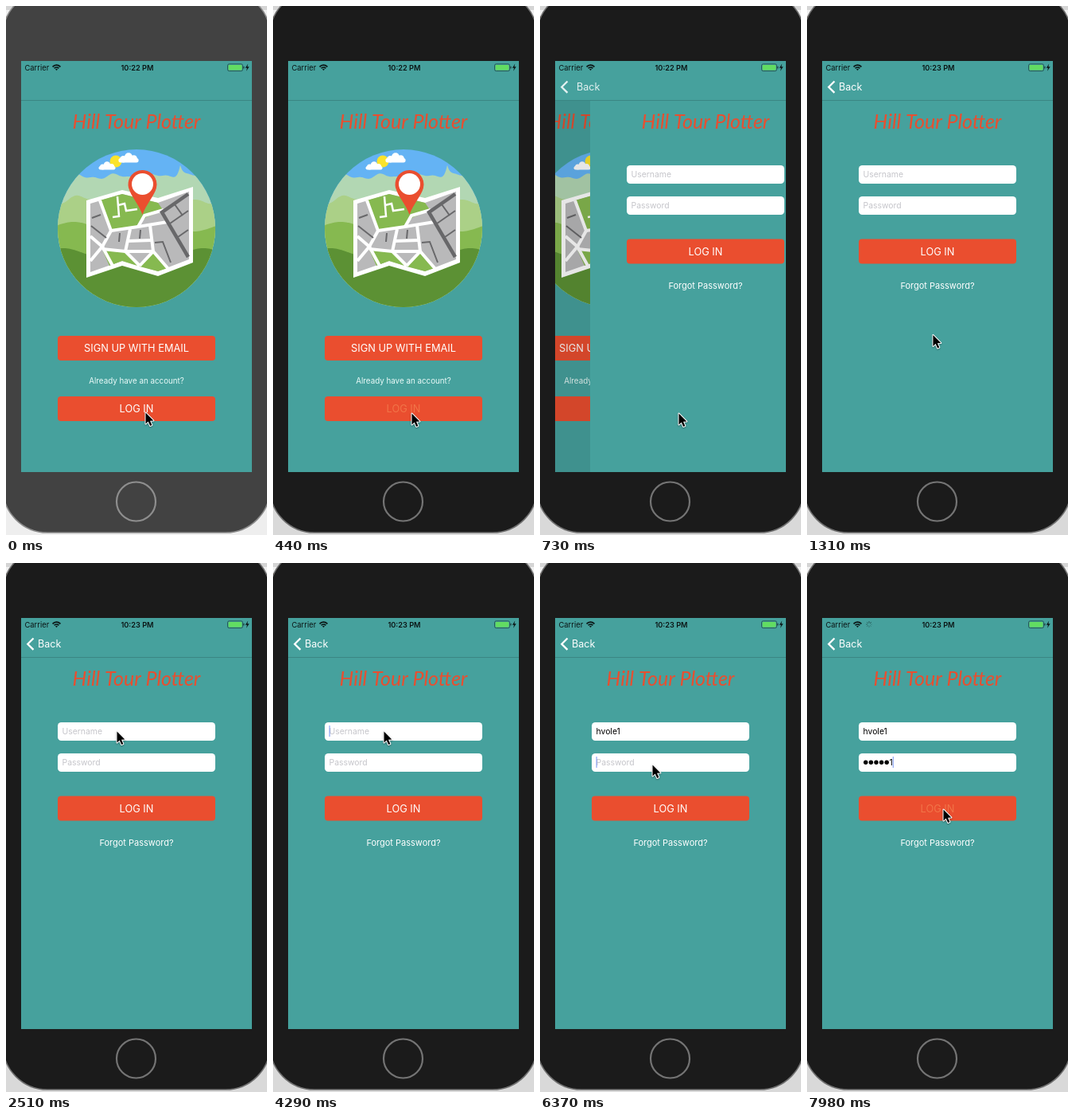
Write an HTML page with a canvas that moves like this. It is 328 px wide and 664 px high and loops after 8000 ms.

```html
<!DOCTYPE html>
<html lang="en">
<head>
<meta charset="utf-8">
<title>Phone login</title>
<style>
html, body { margin: 0; width: 100%; height: 100%; overflow: hidden; background: #eee; }
canvas { display: block; width: 328px; height: 664px; }
</style>
</head>
<body>
<canvas id="stage"></canvas>
<script>
const W = 328, H = 664, LOOP = 8000, STEP = 147.8;
const TEAL = '#46a19d', RED = '#ea4e2f', GREEN = '#86b950', GREY = '#b9b9ba', DARK = '#68686a', INK = '#0b1515';
const SCREEN = { x: 19, y: 69, w: 290, h: 516 };
const USER = 'hvole1', PASS = 'rovin1', TITLE = 'Hill Tour Plotter';

const canvas = document.getElementById('stage');
const dpr = window.devicePixelRatio || 1;
canvas.width = W * dpr;
canvas.height = H * dpr;
const c = canvas.getContext('2d');

const clamp = (v, lo, hi) => Math.max(lo, Math.min(hi, v));
const smooth = t => t * t * (3 - 2 * t);
const rush = t => t ** 3.8;

// Pointer moves, in steps
const MOVES = [
  { from: 0, to: 1, x: 174, y: 511, ease: smooth },
  { from: 6, to: 10, x: 126, y: 217, ease: rush },
  { from: 10, to: 13, x: 97, y: 80, ease: smooth },
  { from: 13, to: 17, x: 139, y: 211, ease: smooth },
  { from: 38, to: 40, x: 144, y: 274, ease: smooth },
  { from: 40, to: 41, x: 141, y: 253, ease: smooth },
  { from: 49, to: 52, x: 171, y: 309, ease: smooth }
];

function pointerAt(s) {
  let x = 175, y = 510;
  for (const m of MOVES) {
    const k = m.ease(clamp((s - m.from) / (m.to - m.from), 0, 1));
    x += (m.x - x) * k;
    y += (m.y - y) * k;
  }
  return [x, y];
}

function trace(p) {
  c.beginPath();
  for (let i = 0; i < p.length; i += 2) c.lineTo(p[i], p[i + 1]);
}

function poly(color, ...p) {
  trace(p);
  c.fillStyle = color;
  c.fill();
}

function line(color, width, ...p) {
  trace(p);
  c.strokeStyle = color;
  c.lineWidth = width;
  c.stroke();
}

// Hill whose outline is height(x), filled down to the foot of the picture
function ridge(color, height) {
  const p = [270, 380, 60, 380];
  for (let x = 60; x <= 270; x++) p.push(x, height(x));
  poly(color, ...p);
}

function disc(color, x, y, r) {
  c.fillStyle = color;
  c.beginPath();
  c.arc(x, y, r, 0, Math.PI * 2);
  c.fill();
}

function box(color, x, y, w, h, r) {
  c.fillStyle = color;
  c.beginPath();
  c.roundRect(x, y, w, h, r);
  c.fill();
}

function text(str, x, y, size, color, align = 'left', style = '', face = 'Inter') {
  c.font = `${style} ${size}px ${face}, sans-serif`;
  c.fillStyle = color;
  c.textAlign = align;
  c.fillText(str, x, y);
}

function cloud(x, y, k) {
  disc('#fff', x - 5.5 * k, y + k, 3.5 * k);
  disc('#fff', x, y - 1.5 * k, 4.2 * k);
  disc('#fff', x + 5.5 * k, y + 0.5 * k, 3.6 * k);
  box('#fff', x - 10.5 * k, y, 21 * k, 4.5 * k, 2.2 * k);
}

function drawMap() {
  poly('#fff', 101, 244, 146, 231, 191, 241, 235, 227, 235, 322, 191, 339, 146, 326, 101, 341);
  poly(GREY, 106, 248, 146, 236, 191, 247, 230, 233, 230, 318, 191, 333, 146, 320, 106, 334);
  poly(GREEN, 118, 244, 146, 236, 191, 247, 198, 257, 176, 265, 166, 276, 132, 282);
  poly(GREEN, 121, 306, 150, 308, 165, 326, 146, 320, 130, 326);
  poly(GREEN, 185, 310, 203, 329, 191, 333, 168, 327);

  const street = (...p) => line('#fff', 4, ...p);
  street(118, 244, 132, 282, 121, 302, 134, 326);
  street(106, 289, 121, 302, 106, 320);
  street(132, 282, 166, 277, 203, 271);
  street(166, 277, 174, 263, 198, 256);
  street(121, 305, 150, 308, 185, 308, 204, 330);
  street(156, 280, 150, 308, 168, 326);
  street(181, 275, 185, 308, 168, 326);
  street(153, 295, 183, 294);
  line('#fff', 2.5, 134, 265, 142, 264, 140, 239);
  line('#fff', 2.5, 141, 250, 149, 248, 151, 257, 165, 255);

  const road = (...p) => line(DARK, 2, ...p);
  line(DARK, 4.5, 229, 236, 196, 259, 229, 315);
  road(206, 273, 229, 257);
  road(216, 290, 229, 281);
  road(212, 249, 222, 263);
  road(107, 276, 126, 291);
  road(108, 266, 119, 262);
  road(143, 285, 142, 296);
  road(169, 281, 168, 292);
  road(187, 297, 197, 296, 207, 322);
}

function drawScene() {
  const { sin, cos, abs, exp } = Math;
  c.save();
  c.beginPath();
  c.arc(164, 279, 99, 0, Math.PI * 2);
  c.clip();
  c.fillStyle = '#64b3f4';
  c.fillRect(60, 175, 210, 210);
  ridge('#b2d7b3', x => 214 + 2.5 * sin(x / 8) + 1.5 * sin(x / 3.7) - 17 * exp(-abs(x - 219) / 4));
  ridge('#abd087', x => 243 + 4 * cos(x / 10) + 2 * sin(x / 5));
  ridge(GREEN, x => 277 - 6 * sin((x - 60) / 16));
  ridge('#5c9134', x => 309 - 5 * cos((x - 72) / 14));
  disc('#fbe32c', 138, 195, 7.5);
  cloud(127, 201, 1);
  cloud(154, 191, 1.2);
  drawMap();
  c.fillStyle = RED;
  c.beginPath();
  c.arc(171.5, 224, 18, Math.PI * 0.92, Math.PI * 0.08);
  c.bezierCurveTo(186, 239, 176, 249, 171.5, 262);
  c.bezierCurveTo(167, 249, 157, 239, 154, 228);
  c.fill();
  disc('#fff', 171.5, 223.5, 13.5);
  c.restore();
}

const drawTitle = () => text(TITLE, 164, 154, 25, '#e84f30', 'center', 'italic', 'Lato');

function button(label, y, pressed) {
  box(RED, 65, y, 198, 31, 4);
  text(label, 164, y + 20.2, 12.8, pressed ? 'rgba(255,190,120,.34)' : '#fff', 'center');
}

function field(y, hint, empty) {
  box('#fff', 65, y, 198, 23, 4.5);
  if (empty) text(hint, 70.5, y + 15.3, 10.4, '#c5c5ca');
}

function caret(x, y, alpha) {
  c.fillStyle = `rgba(66,107,242,${alpha})`;
  c.fillRect(x, y, 1.2, 14);
}

function welcomePage(s) {
  drawTitle();
  drawScene();
  button('SIGN UP WITH EMAIL', 414, false);
  text('Already have an account?', 164, 474, 9.8, '#eafaf8', 'center');
  button('LOG IN', 490, s === 3);
}

function loginPage(s) {
  const typed = s < 30 ? 0 : clamp(s - 33, 1, USER.length);
  const secret = clamp(s - 45, 0, PASS.length);
  drawTitle();

  field(200, 'Username', !typed);
  const name = USER.slice(0, typed);
  text(name, 70.5, 215.3, 10.4, '#000');
  if (s >= 29 && s < 42) caret(70.5 + c.measureText(name).width, 204, 0.6);

  field(239, 'Password', !secret);
  let x = 70.5;
  if (secret) {
    for (let i = 1; i < secret; i++, x += 6.6) disc('#000', x + 3.3, 250.2, 2.7);
    const last = PASS[secret - 1];
    text(last, x, 254.3, 10.4, '#000');
    x += c.measureText(last).width;
  }
  if (s >= 42) caret(x, 243, 0.6);

  button('LOG IN', 292.5, s >= 53);
  text('Forgot Password?', 164, 355, 11, '#fff', 'center');
}

function spinner(x, y) {
  for (let i = 0; i < 8; i++) {
    const a = i * Math.PI / 4, u = Math.cos(a), v = Math.sin(a);
    line(`rgba(20,50,50,${0.25 + i * 0.08})`, 1, x + u * 1.8, y + v * 1.8, x + u * 3.8, y + v * 3.8);
  }
}

function statusBar(s) {
  text('Carrier', 23.5, 80.5, 9.4, INK);
  c.strokeStyle = INK;
  c.lineWidth = 1.7;
  for (const r of [1.2, 4, 6.8]) {
    c.beginPath();
    c.arc(63.5, 81, r, -Math.PI * 0.76, -Math.PI * 0.24);
    c.stroke();
  }
  if (s >= 54) spinner(78, 77);
  text(s < 7 ? '10:22 PM' : '10:23 PM', 165, 80.5, 9.2, INK, 'center', '600');
  c.strokeStyle = '#1f4745';
  c.lineWidth = 0.8;
  c.beginPath();
  c.roundRect(278.5, 72.8, 19, 8.8, 2);
  c.stroke();
  box('#62dc62', 279.6, 73.9, 16.8, 6.6, 1);
  box('#1f4745', 298.3, 75.7, 1.2, 3, 0.6);
  poly(INK, 304.2, 72.5, 300.8, 77.8, 303, 77.8, 302, 81.8, 305.6, 76.3, 303.3, 76.3);
}

function phone(active) {
  c.fillStyle = '#f0f0f0';
  c.fillRect(0, 0, W, H);
  c.fillStyle = '#d5d5d5';
  c.fillRect(0, 0, W, 5);
  c.fillStyle = active ? '#d9d9d9' : '#eeeeee';
  c.fillRect(0, 615, W, 49);
  c.fillStyle = '#d98f62';
  c.fillRect(0, 13, 2, 6);
  box(active ? '#1b1b1b' : '#424242', -4, -19, 336, 680, 56);
  c.strokeStyle = active ? '#6f6f6f' : '#8b8b8b';
  c.lineWidth = 1.6;
  c.stroke();
  c.strokeStyle = active ? '#747474' : '#8e8e8e';
  c.lineWidth = 2.2;
  c.beginPath();
  c.arc(163.5, 622, 24.5, 0, Math.PI * 2);
  c.stroke();
}

function drawPointer(x, y) {
  c.save();
  c.translate(x, y);
  c.lineJoin = 'round';
  c.shadowColor = 'rgba(0,0,0,.35)';
  c.shadowBlur = 2 * dpr;
  c.shadowOffsetY = dpr;
  trace([0.5, 0.5, 0.5, 14.5, 3.7, 11.5, 6.2, 17, 8.4, 16, 6, 10.7, 10.4, 10.5]);
  c.closePath();
  c.strokeStyle = '#fff';
  c.lineWidth = 2;
  c.stroke();
  c.shadowColor = 'transparent';
  c.fillStyle = '#000';
  c.fill();
  c.restore();
}

function pageAt(dx, page, s) {
  c.save();
  c.translate(Math.round(dx), 0);
  c.fillStyle = TEAL;
  c.fillRect(SCREEN.x, 119, SCREEN.w, 466);
  page(s);
  c.restore();
}

function draw(time) {
  const s = Math.floor(time / STEP + 0.14);
  const u = Math.max(0, s - 3.4);
  const push = s >= 8 ? 1 : 1 - Math.exp(-0.741 * u * u);

  c.setTransform(dpr, 0, 0, dpr, 0, 0);
  phone(s >= 3);

  c.save();
  c.beginPath();
  c.rect(SCREEN.x, SCREEN.y, SCREEN.w, SCREEN.h);
  c.clip();
  c.fillStyle = TEAL;
  c.fillRect(SCREEN.x, SCREEN.y, SCREEN.w, SCREEN.h);

  if (push < 1) {
    pageAt(-SCREEN.w * 0.3 * push, welcomePage, s);
    c.fillStyle = `rgba(0,0,0,${0.115 * push})`;
    c.fillRect(SCREEN.x, 119, SCREEN.w, 466);
  }
  if (push > 0) {
    pageAt(SCREEN.w * (1 - push), loginPage, s);
    c.globalAlpha = push;
    line('#fff', 2.3, 34.5, 94.5, 27.3, 101.7, 34.5, 108.9);
    text('Back', 40 + 40 * (1 - push), 106.2, 12.6, '#fff');
    c.globalAlpha = 1;
  }
  c.fillStyle = '#3a8683';
  c.fillRect(SCREEN.x, 118, SCREEN.w, 1);
  statusBar(s);
  c.restore();

  drawPointer(...pointerAt(s));
}

const start = performance.now();
function frame() {
  draw((performance.now() - start) % LOOP);
  requestAnimationFrame(frame);
}
frame();
</script>
</body>
</html>
```
